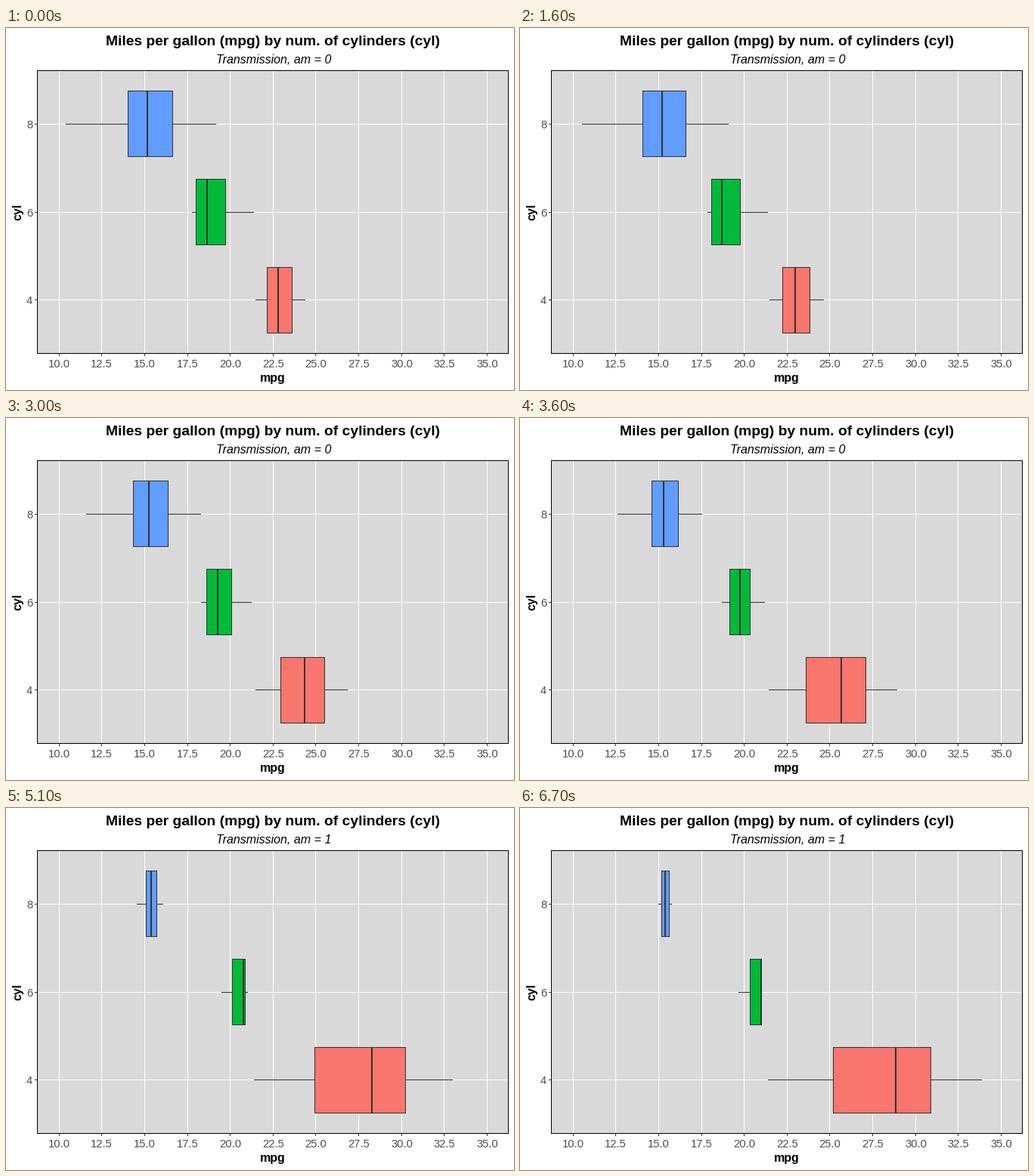
A matplotlib script that plays this animation: 672x480 px, repeating every 8000 ms.

```python
import math

import matplotlib.pyplot as plt
from matplotlib.animation import FuncAnimation
from matplotlib.patches import Rectangle

W, H, DPI = 672, 480, 96
FRAMES, INTERVAL = 80, 100
START, END = 3, 70              # first and last frame of the transition
LEFT, TOP, RIGHT, BOTTOM = 41, 56, 664, 431
INK = "#333333"

# label, fill, top row, whisker row, five-number summaries for am = 0 and am = 1
GROUPS = [
    ("8", "#619CFF", 83, 127,
     (10.4, 14.05, 15.2, 16.625, 19.2), (15.0, 15.2, 15.4, 15.6, 15.8)),
    ("6", "#00BA38", 200, 244,
     (17.8, 18.025, 18.65, 19.75, 21.4), (19.7, 20.35, 21.0, 21.0, 21.0)),
    ("4", "#F8766D", 317, 360,
     (21.5, 22.15, 22.8, 23.6, 24.4), (21.4, 25.2, 28.85, 30.9, 33.9)),
]
BOX_H = 88

plt.rcParams["font.family"] = "Liberation Sans"
fig = plt.figure(figsize=(W / DPI, H / DPI), dpi=DPI, facecolor="white")
ax = fig.add_axes([0, 0, 1, 1])
ax.set_xlim(0, W)
ax.set_ylim(H, 0)
ax.axis("off")


def px(mpg):
    return math.floor(69.66 + (mpg - 10) * 22.65 + 0.5)


def rect(x, y, w, h, color, z=1):
    patch = Rectangle((x, y), w, h, facecolor=color, linewidth=0,
                      antialiased=False, zorder=z)
    return ax.add_patch(patch)


def label(x, y, text, size, ha="center", **style):
    return ax.text(x, y, text, fontsize=size * 72 / DPI, ha=ha,
                   va="baseline", **style)


def ease(t):
    t = min(max(t, 0), 1)
    return 4 * t ** 3 if t < 0.5 else 1 - 4 * (1 - t) ** 3


def draw_panel():
    width, height = RIGHT - LEFT + 1, BOTTOM - TOP + 1
    rect(LEFT, TOP, width, height, "#D9D9D9")
    for i in range(11):
        mpg = 10 + 2.5 * i
        x = px(mpg)
        rect(x, TOP, 1, height, "white")
        rect(x, BOTTOM + 1, 1, 3, INK)
        label(x + 0.5, 450, f"{mpg:.1f}", 14.8, color="#4D4D4D")
    for name, _, _, row, _, _ in GROUPS:
        rect(LEFT, row, width, 1, "white")
        rect(LEFT - 3, row, 3, 1, INK)
        label(35, row + 6, name, 14.8, ha="right", color="#4D4D4D")
    for y in (TOP, BOTTOM):
        rect(LEFT, y, width, 1, "black", 5)
    for x in (LEFT, RIGHT):
        rect(x, TOP, 1, height, "black", 5)
    label(353, 23, "Miles per gallon (mpg) by num. of cylinders (cyl)",
          19.3, weight="bold")
    label(353, 469, "mpg", 16, weight="bold")
    ax.text(20, 243.5, "cyl", fontsize=12, weight="bold", rotation=90,
            rotation_mode="anchor", ha="center", va="baseline")


class Box:
    def __init__(self, fill, top, row, before, after):
        self.before, self.after = before, after
        self.whiskers = [rect(0, row, 1, 1, INK, 2) for _ in range(2)]
        self.frame = rect(0, top, 1, BOX_H, INK, 3)
        self.body = rect(0, top + 1, 1, BOX_H - 2, fill, 3)
        self.median = rect(0, top + 1, 2, BOX_H - 2, INK, 4)

    def parts(self):
        return [*self.whiskers, self.frame, self.body, self.median]

    def move(self, p):
        low, q1, mid, q3, high = (
            px(a + (b - a) * p) for a, b in zip(self.before, self.after))
        spans = [(low, q1), (q3, high), (q1, q3 + 1), (q1 + 1, q3)]
        for part, (x0, x1) in zip(self.parts(), spans):
            part.set_x(x0)
            part.set_width(max(x1 - x0, 0))
        self.median.set_x(mid - 1)


draw_panel()
subtitle = label(354, 47, "", 16, style="italic")
boxes = [Box(*group[1:]) for group in GROUPS]


def update(n):
    t = (n - START) / (END - START)
    for box in boxes:
        box.move(ease(t))
    subtitle.set_text(f"Transmission, am = {int(t >= 0.5)}")
    return [subtitle] + [part for box in boxes for part in box.parts()]


anim = FuncAnimation(fig, update, frames=FRAMES, interval=INTERVAL,
                     repeat=True, repeat_delay=0, blit=False)
plt.show()
```
